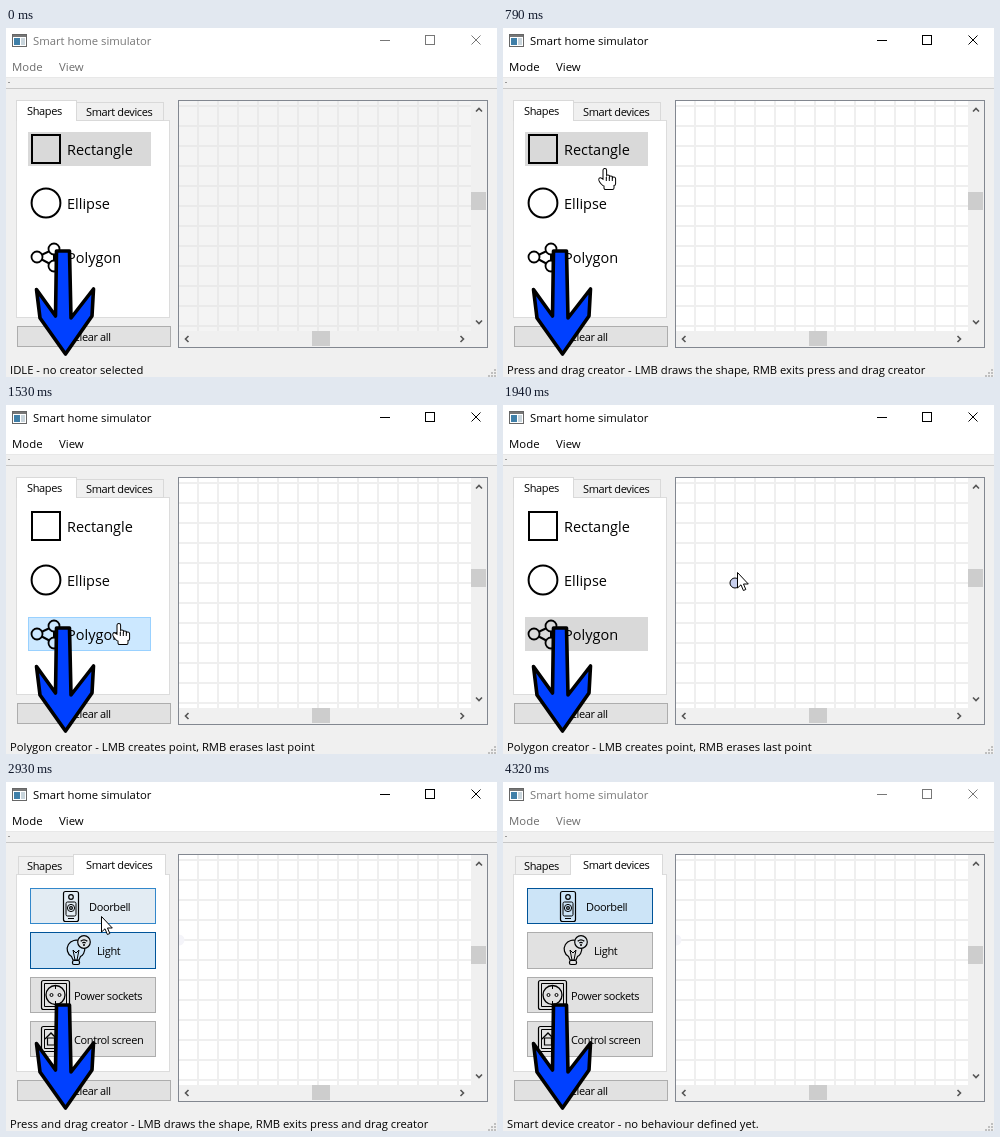
An HTML page with a canvas that plays this animation: 491x349 px, repeating every 4370 ms.

```html
<!DOCTYPE html>
<html lang="en">
<head>
<meta charset="utf-8">
<title>Smart home simulator</title>
<style>
html, body { margin: 0; width: 100%; height: 100%; overflow: hidden; background: #f0f0f0; }
canvas { display: block; }
</style>
</head>
<body>
<canvas id="stage" width="491" height="349"></canvas>
<script>
const ctx = document.getElementById('stage').getContext('2d');
const LOOP = 4370;
const OFFSTAGE = { x: 440, y: 365 };

// Pointer moves, eased from wherever the last one ended
const MOVES = [
  { from: 140, to: 500, x: 102, y: 134 },
  { from: 720, to: 1000, x: 97, y: 170 },
  { from: 1170, to: 1380, x: 93, y: 226 },
  { from: 1420, to: 1900, x: 235, y: 167 },
  { from: 1960, to: 2260, x: 101, y: 169 },
  { from: 2360, to: 2500, x: 135, y: 80 },
  { from: 2650, to: 2880, x: 96, y: 134 },
  { from: 3720, to: 4040, ...OFFSTAGE }
];

const PRESS = 'Press and drag creator - LMB draws the shape, RMB exits press and drag creator';
const STATES = [
  { t: 0, pick: 0, status: 'IDLE - no creator selected' },
  { t: 500, pick: 0, status: PRESS },
  { t: 960, pick: 1, status: PRESS },
  { t: 1400, pick: 2, status: 'Polygon creator - LMB creates point, RMB erases last point' },
  { t: 2240, pick: 1, status: PRESS },
  { t: 3090, pick: 1, status: 'Smart device creator - no behaviour defined yet.' }
];
const SWITCH_TAB = 2650, PICK_DOORBELL = 3090, BLUR = 4320;
const CHECKED = ['#cce4f7', '#005499'], HOVER = ['#e5f1fb', '#0078d7'];

const ramp = (t, a, b) => Math.max(0, Math.min(1, (t - a) / (b - a)));
const smooth = k => k * k * (3 - 2 * k);

function pointer(t) {
  let { x, y } = OFFSTAGE;
  for (const m of MOVES) {
    const k = smooth(ramp(t, m.from, m.to));
    x += (m.x - x) * k;
    y += (m.y - y) * k;
  }
  return [Math.round(x), Math.round(y)];
}

function fill(x, y, w, h, color) {
  ctx.fillStyle = color;
  ctx.fillRect(x, y, w, h);
}

function frame(x, y, w, h, color, edge) {
  fill(x + 1, y + 1, w - 2, h - 2, color);
  ctx.strokeStyle = edge;
  ctx.lineWidth = 1;
  ctx.strokeRect(x + 0.5, y + 0.5, w - 1, h - 1);
}

function text(s, x, y, size, color = '#000', spacing = 0) {
  ctx.font = `${size}px "Open Sans", "Noto Sans", sans-serif`;
  ctx.letterSpacing = spacing + 'px';
  ctx.fillStyle = color;
  ctx.fillText(s, x, y);
}

const label = (s, x, y) => text(s, x, y, 11, '#000', -0.38);

function trace(points, close) {
  ctx.beginPath();
  points.forEach(p => ctx.lineTo(...p));
  if (close) ctx.closePath();
}

function ink(width = 1, color = '#000') {
  ctx.lineWidth = width;
  ctx.strokeStyle = color;
  ctx.stroke();
}

function line(points, width, color) {
  trace(points);
  ink(width, color);
}

function circle(x, y, r, width = 1, color) {
  ctx.beginPath();
  ctx.arc(x, y, r, 0, Math.PI * 2);
  if (color) { ctx.fillStyle = color; ctx.fill(); }
  if (width) ink(width);
}

function box(x, y, w, h, r, width = 1) {
  ctx.beginPath();
  ctx.roundRect(x, y, w, h, r);
  ink(width);
}

function titleBar(active) {
  const title = active ? '#000' : '#777', menu = active ? '#000' : '#6d6d6d';
  fill(0, 0, 491, 349, '#f0f0f0');
  fill(0, 0, 491, 49, '#fff');
  fill(0, 49, 491, 1, '#e8e8e8');
  fill(0, 60, 491, 1, '#c8c8c8');
  fill(2, 54, 2, 1, '#999');
  frame(6, 6, 15, 13, '#fff', '#666');
  fill(7, 7, 13, 2, '#777');
  fill(8, 10, 6, 7, '#3f7fa8');
  fill(15, 10, 4, 7, '#c9d5dc');
  text('Smart home simulator', 27, 17, 11.3, title);
  text('Mode', 6, 43, 11.4, menu);
  text('View', 53, 43, 11.4, menu);
  fill(374, 12, 10, 1, title);
  frame(419, 7, 10, 10, '#fff', title);
  line([[465.5, 7.5], [474.5, 16.5]], 1, title);
  line([[474.5, 7.5], [465.5, 16.5]], 1, title);
}

function chevron(x, y, angle) {
  ctx.save();
  ctx.translate(x, y);
  ctx.rotate(angle * Math.PI / 2);
  line([[-1.5, -3], [1.5, 0], [-1.5, 3]], 1.6, '#555');
  ctx.restore();
}

function scene(live, ghost) {
  frame(172, 72, 310, 248, live ? '#fff' : '#f4f4f4', '#828790');
  ctx.save();
  ctx.beginPath();
  ctx.rect(173, 73, 292, 230);
  ctx.clip();
  const grid = live ? '#efefef' : '#eaeaea';
  for (let x = 191; x < 465; x += 20) fill(x, 73, 2, 230, grid);
  for (let y = 77; y < 303; y += 20) fill(173, y, 292, 2, grid);
  if (ghost) circle(173, 158, 5.5, 0, '#f4f4f9');
  ctx.restore();
  fill(465, 73, 16, 246, '#f0f0f0');
  fill(173, 303, 308, 16, '#f0f0f0');
  fill(465, 164, 15, 18, '#cdcdcd');
  fill(306, 303, 18, 15, '#cdcdcd');
  chevron(473, 294, 1);
  chevron(473, 82, 3);
  chevron(456, 311, 0);
  chevron(181, 311, 2);
}

function tab(name, x, w, tx, on, hover) {
  const y = on ? 72 : 74;
  frame(x, y, w, 93 - y, on ? '#fff' : hover ? '#d8eaf9' : '#f0f0f0', '#d9d9d9');
  if (on) fill(x + 1, 91, w - 2, 3, '#fff');
  label(name, tx, on ? 87 : 88);
}

function tabs(devices, hover) {
  frame(10, 92, 154, 198, '#fff', '#dcdcdc');
  if (devices) {
    tab('Shapes', 12, 56, 21, false);
    tab('Smart devices', 67, 93, 80, true);
  } else {
    tab('Smart devices', 70, 88, 80, false, hover);
    tab('Shapes', 10, 61, 21, true);
  }
}

function shapeList(pick, x, y) {
  let nodeColor = '#fff';
  ['Rectangle', 'Ellipse', 'Polygon'].forEach((name, i) => {
    const top = 104 + i * 54;
    const hover = x >= 22 && x < 145 && y >= top && y < top + 34;
    const color = i === pick ? (hover ? '#cce8ff' : '#d9d9d9') : hover ? '#e5f3ff' : '#fff';
    frame(22, top, 123, 34, color, i === pick && hover ? '#99d1ff' : color);
    text(name, 61, top + 23, 14.5);
    nodeColor = color;
  });
  box(26, 107, 28, 28, 0, 2);
  circle(40, 175, 14.4, 2);
  const nodes = [[48, 221], [31, 229], [48, 238]];
  trace(nodes, true);
  ink(2);
  for (const [nx, ny] of nodes) circle(nx, ny, 5.5, 1.8, nodeColor);
}

function button(y, h, tint, alpha) {
  frame(24, y, 126, h, '#e1e1e1', '#adadad');
  if (!alpha) return;
  ctx.globalAlpha = alpha;
  frame(24, y, 126, h, ...tint);
  ctx.globalAlpha = 1;
}

function doorbellIcon() {
  box(57.5, 109.5, 15, 30, 2, 1.2);
  circle(65, 115, 2.3, 1.2);
  box(60, 120, 10, 14, 1.5);
  circle(65, 126, 3.6);
  circle(65, 126, 1.4, 1.2);
  line([[62, 136.5], [68, 136.5]]);
}

function lightIcon() {
  ctx.beginPath();
  ctx.arc(70, 167, 8.8, 2.1, 1.04 + Math.PI * 2);
  ctx.lineTo(73, 178);
  ctx.lineTo(67, 178);
  ctx.closePath();
  ink(1.2);
  box(66.5, 178.5, 7, 4, 1.5, 1.2);
  line([[69, 178], [67, 168], [70, 171], [73, 168], [71, 178]]);
  circle(78, 160, 6.3, 1.2, '#dfe4e8');
  for (const r of [2.5, 5]) {
    ctx.beginPath();
    ctx.arc(78, 163, r, -2.3, -0.84);
    ink(1.2);
  }
  circle(78, 163, 1, 0, '#000');
}

function wallIcons() {
  for (const [y, h] of [[198.5, 29], [244.5, 25]]) {
    box(35.5, y, 28, h, 2, 1.2);
    box(38.5, y + 3, 22, h - 6, 0);
  }
  circle(49.5, 213, 9.5, 1.3);
  for (const side of [-1, 1]) {
    circle(49.5 + 4 * side, 213, 1.5);
    line([[49.5, 213 + 6 * side], [49.5, 213 + 9 * side]]);
  }
  line([[39, 257], [45, 251], [51, 257]], 1.4);
  box(41.5, 256, 7, 7, 0, 1.2);
}

function deviceList(t) {
  const picked = t >= PICK_DOORBELL;
  button(106, 36, picked ? CHECKED : HOVER, picked ? 1 : ramp(t, 2860, 2960));
  button(150, 37, CHECKED, 1 - ramp(t, PICK_DOORBELL, PICK_DOORBELL + 160));
  button(195, 36);
  button(239, 36);
  doorbellIcon();
  lightIcon();
  wallIcons();
  label('Doorbell', 83, 129);
  label('Light', 91, 173);
  label('Power sockets', 68, 218);
  label('Control screen', 68, 262);
}

function footer(status) {
  frame(11, 298, 154, 21, '#e1e1e1', '#adadad');
  label('Clear all', 67, 313);
  text(status, 4, 346, 11.24);
  for (let i = 0; i < 3; i++)
    for (let j = 0; j <= i; j++) fill(488 - j * 3, 341 + i * 3, 2, 2, '#bfbfbf');
}

function hand() {
  const path = new Path2D();
  for (let i = 0; i < 4; i++) {
    const top = i ? 6.5 + i : 1;
    path.roundRect(-0.5 + 3 * i, top, 2.6, 17 - top, 1.2);
  }
  path.roundRect(0.5, 11, 9, 10, 1);
  path.ellipse(-1.5, 14, 1.8, 4.5, -0.7, 0, Math.PI * 2);
  ctx.strokeStyle = '#000';
  ctx.lineWidth = 2;
  ctx.stroke(path);
  ctx.fillStyle = '#fff';
  ctx.fill(path);
  for (let i = 1; i < 4; i++) line([[3 * i - 0.7, 9], [3 * i - 0.7, 13]]);
}

function solid(color, width) {
  ctx.fillStyle = color;
  ctx.fill();
  ctx.lineJoin = 'round';
  ink(width);
  ctx.lineJoin = 'miter';
}

function cursor(x, y, overList) {
  ctx.save();
  ctx.translate(x, y);
  if (overList) {
    hand();
  } else {
    trace([[-0.5, 0.5], [-0.5, 16], [3, 12.8], [5.4, 18.5], [7.8, 17.5], [5.5, 12], [10.3, 12]], true);
    solid('#fff', 1);
  }
  ctx.restore();
}

function bigArrow() {
  trace([[50.5, 223], [63.5, 223], [65, 290], [87.5, 261], [86, 288], [59.5, 326],
    [34, 290], [30.5, 261.5], [49.5, 288]], true);
  solid('#0040ff', 3.6);
}

function draw(t) {
  const [x, y] = pointer(t);
  const { pick, status } = STATES.filter(s => s.t <= t).pop();
  const devices = t >= SWITCH_TAB;
  const live = t >= STATES[1].t;
  const inScene = x > 173 && x < 465;
  titleBar(live && t < BLUR);
  scene(live, t > 2150);
  tabs(devices, x >= 71 && x < 158 && y >= 75 && y < 93);
  if (devices) deviceList(t);
  else shapeList(pick, x, y);
  footer(status);
  if (pick === 2 && inScene) {
    const snap = (v, origin) => origin + 20 * Math.round((v - origin) / 20);
    circle(snap(x, 172), snap(y + 2, 158), 5, 1, '#c8d0ee');
  }
  cursor(x, y, !devices && x > 11 && x < 163 && y > 95 && y < 289);
  bigArrow();
}

function tick() {
  draw(performance.now() % LOOP);
  requestAnimationFrame(tick);
}
tick();
</script>
</body>
</html>
```
